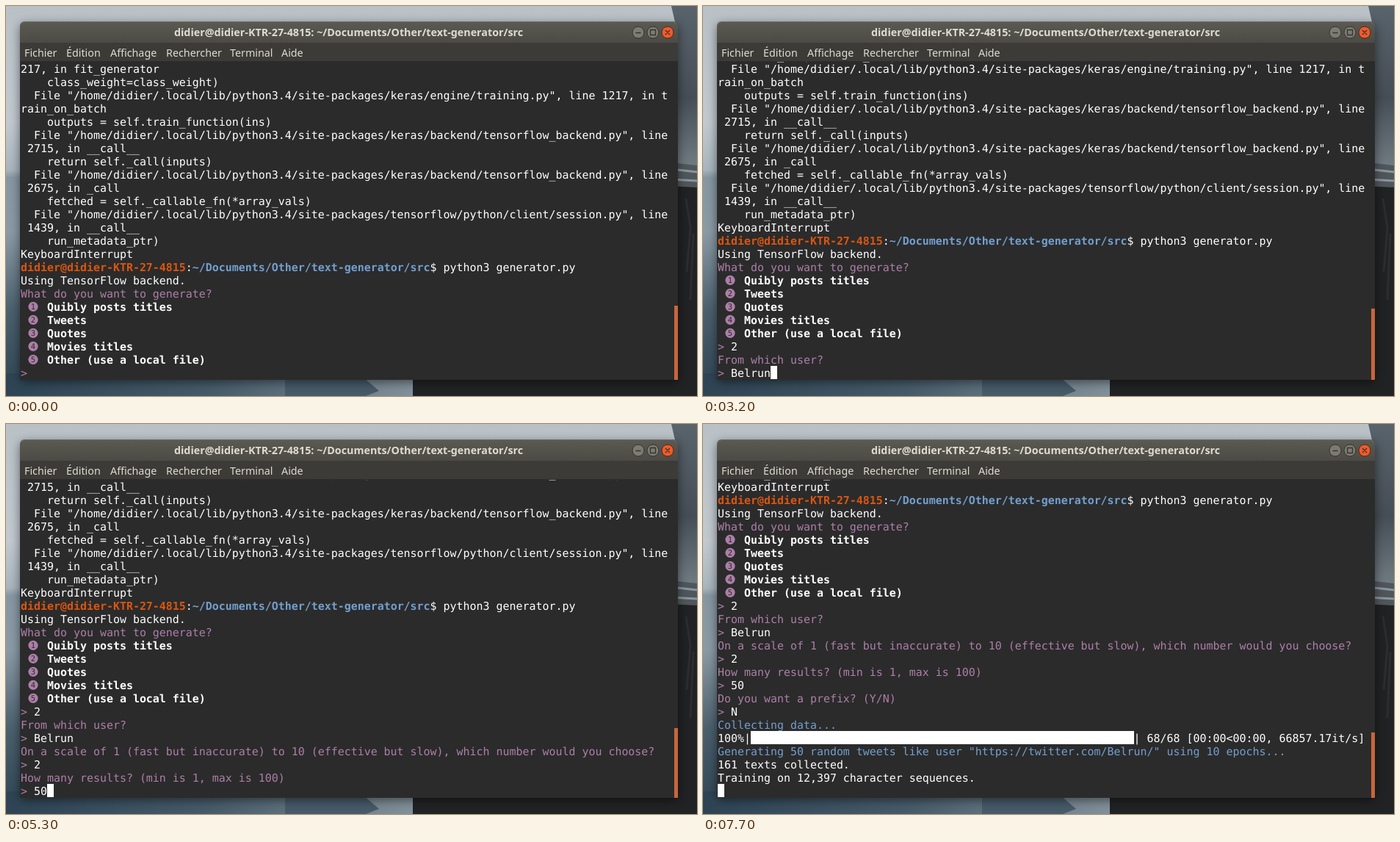
Recreate the animation shown at these times as an HTML page. Size 941 px wide and 531 px high, loop 8000 ms.

```html
<!DOCTYPE html>
<html lang="fr">
<head>
<meta charset="utf-8">
<title>Terminal</title>
<style>
  html, body { margin: 0; width: 100%; height: 100%; overflow: hidden; background: #2b2b2b; }
  svg { display: block; width: 941px; height: 531px; }
  .ui { font: 14.3px "Noto Sans", "Open Sans", sans-serif; fill: #dfdbd2; }
  .title { font-weight: 700; text-anchor: middle; }
  .term { font: 14.95px "DejaVu Sans Mono", monospace; fill: #fff; text-rendering: geometricPrecision; }
  .term text { white-space: pre; }
  .ask { fill: #ad7fa8; }
  .info { fill: #729fcf; }
  .host { fill: #dc560f; font-weight: 700; }
  .path { fill: #729fcf; font-weight: 700; }
  .bold { font-weight: 700; }
  .num { fill: #2b2b2b; font-size: 10.5px; text-anchor: middle; }
</style>
</head>
<body>
<svg viewBox="0 0 941 531">
  <defs>
    <linearGradient id="sky" x2="0" y2="1">
      <stop offset="0" stop-color="#b9c1c7"/>
      <stop offset=".3" stop-color="#c2cad0"/>
      <stop offset=".42" stop-color="#a9b5bd"/>
      <stop offset=".44" stop-color="#8797a2"/>
      <stop offset=".58" stop-color="#8b9ba6"/>
      <stop offset=".78" stop-color="#4c606e"/>
      <stop offset="1" stop-color="#2e4453"/>
    </linearGradient>
    <linearGradient id="cliff" x2="0" y2="1">
      <stop offset="0" stop-color="#59636b"/>
      <stop offset=".5" stop-color="#454e56"/>
      <stop offset="1" stop-color="#7f8a91"/>
    </linearGradient>
    <linearGradient id="lake">
      <stop offset="0" stop-color="#2e4454"/>
      <stop offset=".5" stop-color="#465b69"/>
      <stop offset="1" stop-color="#83919a"/>
    </linearGradient>
    <linearGradient id="bar" x2="0" y2="1">
      <stop offset="0" stop-color="#5b5a52"/>
      <stop offset="1" stop-color="#3d3c38"/>
    </linearGradient>
    <filter id="soft" x="-10%" y="-10%" width="120%" height="120%">
      <feGaussianBlur stdDeviation="7"/>
    </filter>
    <clipPath id="screen"><rect x="19" y="76" width="896" height="433"/></clipPath>
  </defs>

  <rect width="941" height="531" fill="url(#sky)"/>
  <path d="M941 0H906L912 26V250H941Z" fill="url(#cliff)"/>
  <path d="M905 213L941 217V250H905Z" fill="#50575c"/>
  <path d="M905 222l36 4M905 236l36 2" stroke="#8b959b" stroke-width="3"/>
  <path d="M0 500H560V531H0Z" fill="url(#lake)"/>
  <path d="M380 500H480L508 524L490 531H380Z" fill="#465a68"/>
  <path d="M554 500H900V245L941 247V531H554Z" fill="#212223"/>
  <path d="M926 262l6 40l-5 60M936 310l-4 90" stroke="#2c2d2f" stroke-width="3" fill="none"/>

  <rect x="19" y="25" width="896" height="487" rx="6" fill="#000" opacity=".5" filter="url(#soft)"/>
  <path d="M19 76V28q0-7 7-7H908q7 0 7 7V76Z" fill="url(#bar)"/>
  <path d="M21 25q2-3.500 6-3.500H907q4 0 6 3.500" fill="none" stroke="#6c6b62"/>
  <rect x="19" y="50" width="896" height="26" fill="#3c3b37"/>
  <rect x="19" y="75" width="896" height="434" fill="#2b2b2b"/>

  <g class="ui" id="menu">
    <text class="title" x="466.500" y="41">didier@didier-KTR-27-4815: ~/Documents/Other/text-generator/src</text>
  </g>
  <g stroke="#34332f" fill="#7c7a72">
    <circle cx="861" cy="36" r="8"/>
    <circle cx="881" cy="36" r="8"/>
    <circle cx="901" cy="36" r="8" fill="#ee5b2b" stroke="#54291a"/>
    <path d="M857.500 36.500h7M877.500 32.500h7v7h-7ZM898 33l6 6M904 33l-6 6" fill="none" stroke-width="1.300"/>
  </g>

  <g clip-path="url(#screen)">
    <g class="term" id="lines"></g>
    <rect id="cursor" y="490" width="9" height="18" fill="#fff"/>
  </g>
  <rect id="thumb" x="910" width="5" fill="#c7663b"/>
</svg>
<script>
const LOOP = 8000, ROW = 18, COL = 9, LEFT = 20, BOTTOM = 490;
const $ = id => document.getElementById(id);

function add(parent, tag, attrs = {}, text = '') {
  const el = document.createElementNS('http://www.w3.org/2000/svg', tag);
  for (const k in attrs) el.setAttribute(k, attrs[k]);
  el.textContent = text;
  return parent.appendChild(el);
}

[['Fichier', 25], ['Édition', 82], ['Affichage', 142], ['Rechercher', 218], ['Terminal', 305], ['Aide', 375]]
  .forEach(([label, x]) => add($('menu'), 'text', { x, y: 69 }, label));

// Line builders: a line is a list of [class, text] runs, with optional extras.
const plain = text => ({ runs: [['', text]] });
const ask = text => ({ runs: [['ask', text]] });
const info = text => ({ runs: [['info', text]] });
const file = (path, rest) =>
  plain(`  File "/home/didier/.local/lib/python3.4/site-packages/${path}.py", line${rest || ''}`);
const option = (num, text) => ({ num, runs: [['bold', '    ' + text]] });
const answer = text => ({ answer: text, runs: [['ask', '> '], ['', text]] });

const lines = [
  plain('217, in fit_generator'),
  plain('    class_weight=class_weight)'),
  file('keras/engine/training', ' 1217, in t'),
  plain('rain_on_batch'),
  plain('    outputs = self.train_function(ins)'),
  file('keras/backend/tensorflow_backend'),
  plain(' 2715, in __call__'),
  plain('    return self._call(inputs)'),
  file('keras/backend/tensorflow_backend'),
  plain(' 2675, in _call'),
  plain('    fetched = self._callable_fn(*array_vals)'),
  file('tensorflow/python/client/session'),
  plain(' 1439, in __call__'),
  plain('    run_metadata_ptr)'),
  plain('KeyboardInterrupt'),
  { runs: [['host', 'didier@didier-KTR-27-4815'], ['', ':'],
    ['path', '~/Documents/Other/text-generator/src'], ['', '$ python3 generator.py']] },
  plain('Using TensorFlow backend.'),
  ask('What do you want to generate?'),
  option(1, 'Quibly posts titles'),
  option(2, 'Tweets'),
  option(3, 'Quotes'),
  option(4, 'Movies titles'),
  option(5, 'Other (use a local file)'),
  answer('2'),
  ask('From which user?'),
  answer('Belrun'),
  ask('On a scale of 1 (fast but inaccurate) to 10 (effective but slow), which number would you choose?'),
  answer('2'),
  ask('How many results? (min is 1, max is 100)'),
  answer('50'),
  ask('Do you want a prefix? (Y/N)'),
  answer('N'),
  info('Collecting data...'),
  { fill: [5, 58], runs: [['', '100%|' + ' '.repeat(58) + '| 68/68 [00:00<00:00, 66857.17it/s]']] },
  info('Generating 50 random tweets like user "https://twitter.com/Belrun/" using 10 epochs...'),
  plain('161 texts collected.'),
  plain('Training on 12,397 character sequences.')
];

for (const line of lines) {
  line.el = add($('lines'), 'g');
  if (line.fill) {
    const [from, count] = line.fill;
    add(line.el, 'rect', { x: LEFT + from * COL, width: count * COL, height: ROW });
  }
  if (line.num) {
    add(line.el, 'circle', { class: 'ask', cx: 37, cy: 9.3, r: 6.6 });
    add(line.el, 'text', { class: 'num', x: 37, y: 13.1 }, line.num);
  }
  const text = add(line.el, 'text', { x: LEFT, y: 15 });
  for (const [cls, part] of line.runs) line.last = add(text, 'tspan', { class: cls }, part);
}

// Each step: time, then whatever changes from the step before.
const steps = [
  [0, { rows: 24, typed: '', on: false, thumb: 408 }],
  [200, { on: true }],
  [700, { typed: '2' }],
  [1100, { thumb: 410 }],
  [1500, { rows: 26, typed: '' }],
  [2300, { typed: 'B' }],
  [2400, { typed: 'Bel' }],
  [2500, { typed: 'Belr' }],
  [2800, { typed: 'Belrun' }],
  [3200, { thumb: 412 }],
  [3500, { rows: 28, typed: '' }],
  [3700, { on: false }],
  [4000, { on: true }],
  [4200, { typed: '2' }],
  [4400, { thumb: 414 }],
  [4500, { rows: 30, typed: '' }],
  [5300, { typed: '50' }],
  [5600, { rows: 32, typed: '', thumb: 416 }],
  [6200, { on: false }],
  [6300, { on: true }],
  [6500, { typed: 'N' }],
  [7000, { rows: 34, typed: '', thumb: 418 }],
  [7200, { rows: 36, thumb: 419 }],
  [7300, { rows: 38, on: false, thumb: 420 }],
  [7700, { on: true }]
];

function stateAt(t) {
  return Object.assign({}, ...steps.filter(s => s[0] <= t).map(s => s[1]));
}

function draw(t) {
  const { rows, typed, on, thumb } = stateAt(t);
  const current = rows - 1;
  lines.forEach((line, i) => {
    const active = i === current && line.answer;
    line.el.setAttribute('display', i < current || active ? 'inline' : 'none');
    line.el.setAttribute('transform', `translate(0 ${BOTTOM + (i - current) * ROW})`);
    if (line.answer) line.last.textContent = active ? typed : line.answer;
  });
  const prompt = lines[current] && lines[current].answer ? 2 : 0;
  $('cursor').setAttribute('x', LEFT + (prompt + typed.length) * COL);
  $('cursor').setAttribute('visibility', on ? 'visible' : 'hidden');
  $('thumb').setAttribute('y', thumb);
  $('thumb').setAttribute('height', 509 - thumb);
}

const start = performance.now();
function tick() {
  draw((performance.now() - start) % LOOP);
  requestAnimationFrame(tick);
}
tick();
</script>
</body>
</html>
```
